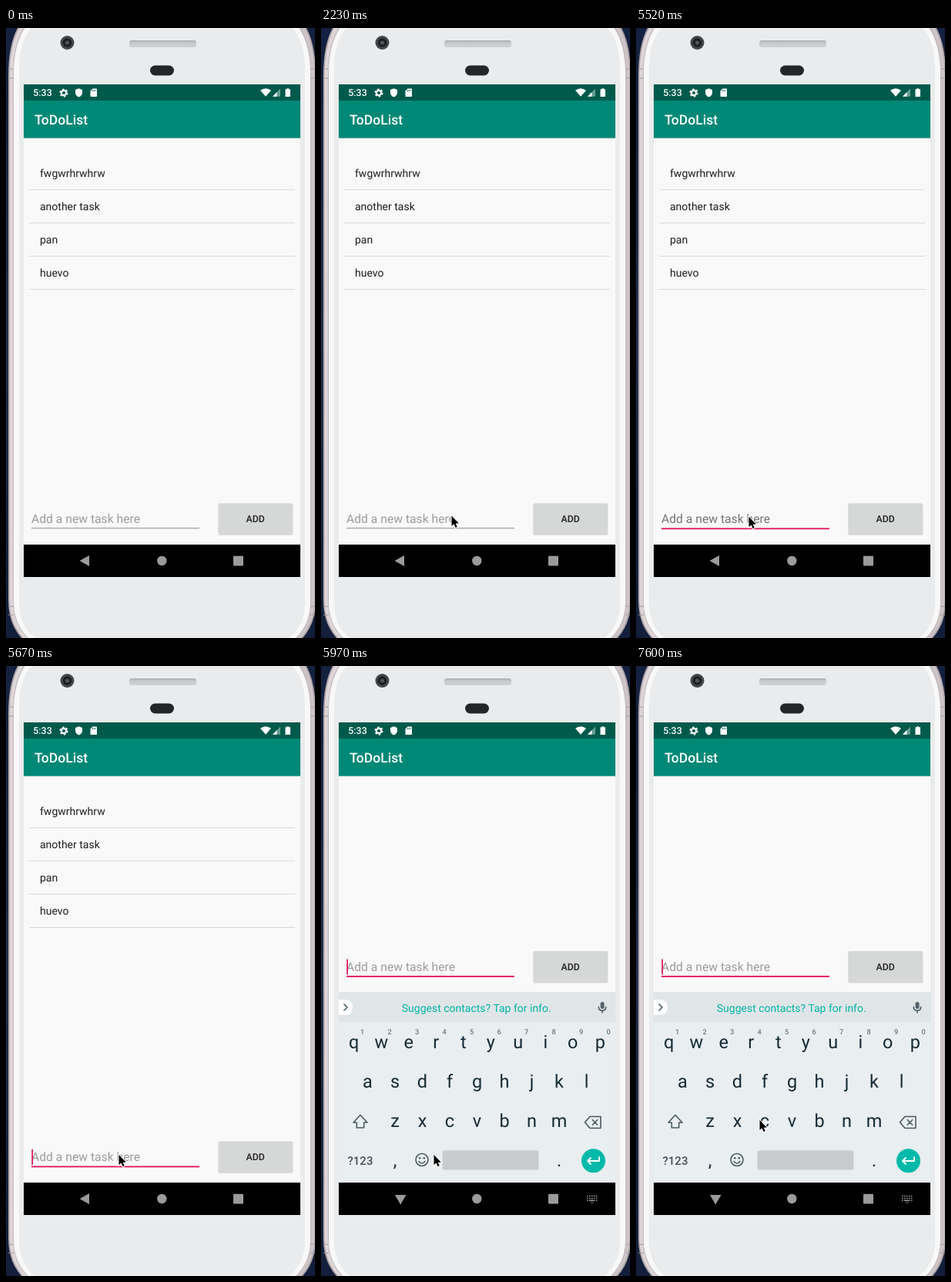
These frames come from a looping animation (401x790 px, 8 s). An HTML page:

```html
<!DOCTYPE html>
<html lang="en">
<head>
<meta charset="utf-8">
<title>To-do app demo</title>
<style>
  html, body { margin: 0; width: 100%; height: 100%; overflow: hidden; background: #17233f; }
  svg { display: block; width: 401px; height: 790px; }
  text { font-family: Roboto, "Noto Sans", sans-serif; text-rendering: geometricPrecision; }
  .medium { font-weight: 500; }
  .mid { text-anchor: middle; }
  .key { font-size: 23.5px; fill: #142b35; }
  .digit { font-size: 9.3px; font-weight: 500; fill: #6c7a80; }
  .line { fill: none; stroke: #4a5a62; stroke-width: 1.6; stroke-linejoin: round; stroke-linecap: round; }
</style>
</head>
<body>
<svg viewBox="0 0 401 790" xmlns="http://www.w3.org/2000/svg">
  <defs>
    <linearGradient id="night" x2="0" y2="1">
      <stop offset="0" stop-color="#14203f"/>
      <stop offset=".5" stop-color="#24304d"/>
      <stop offset="1" stop-color="#131f3a"/>
    </linearGradient>
    <linearGradient id="grille" x2="0" y2="1">
      <stop offset="0" stop-color="#a9abae"/>
      <stop offset=".35" stop-color="#c6c8ca"/>
      <stop offset="1" stop-color="#d0d2d4"/>
    </linearGradient>
    <clipPath id="screen"><rect x="23" y="73" width="359" height="638"/></clipPath>
    <g id="side">
      <path d="M203 0H15Q3 22 3 62V742Q3 771 20 790H203Z" fill="#aaa0a4"/>
      <path d="M203 0H17Q4.500 23 4.500 62V742Q4.500 770 22 790H203Z" fill="currentColor"/>
      <path d="M23 0Q9.500 22 9.500 60V744Q9.500 771 28 790" fill="none" stroke="#bfb6b9"/>
      <path d="M203 0H25Q10 22 10 60V744Q10 771 29 790H203Z" fill="#f9f8f9"/>
      <path d="M203 0H33Q17 18 17 52V745Q17 773 37 790H203Z" fill="#e9ebec"/>
      <path d="M3 53H10M3 65H10M3 749H10M3 760H10" stroke="#a09a9e"/>
    </g>
  </defs>

  <rect width="401" height="790" fill="url(#night)"/>
  <use href="#side" color="#ddd5d7"/>
  <use href="#side" color="#cdc4c7" transform="translate(405 0) scale(-1 1)"/>
  <circle cx="79.500" cy="19" r="9" fill="#44464a"/>
  <circle cx="79.500" cy="19" r="5.800" fill="#1d1e22"/>
  <circle cx="79.500" cy="19" r="2.600" fill="#50545b"/>
  <rect x="160" y="16" width="87" height="9" rx="3" fill="url(#grille)"/>
  <rect x="187" y="48.500" width="31" height="13" rx="6.500" fill="#242529"/>

  <g clip-path="url(#screen)">
    <rect x="23" y="73" width="359" height="638" fill="#f9f9f9"/>
    <rect x="23" y="94" width="359" height="48.600" fill="#008876"/>
    <rect x="23" y="73" width="359" height="21" fill="#005a4c"/>
    <text class="medium" x="37" y="125" font-size="17.500" fill="#fff">ToDoList</text>

    <g fill="#fff">
      <text class="medium" x="35.300" y="88.300" font-size="12.400">5:33</text>
      <g fill="none" stroke="#fff">
        <circle cx="75" cy="84" r="3.200" stroke-width="2.200"/>
        <circle cx="75" cy="84" r="4.800" stroke-width="1.500" stroke-dasharray="2.500 2.526"/>
      </g>
      <path d="M94.500 78.300L99 80V83.500Q99 87.500 94.500 89.500Q90 87.500 90 83.500V80Z"/>
      <path d="M112.500 78.500H117.200Q118 78.500 118 79.300V88.200Q118 89 117.200 89H110.300Q109.500 89 109.500 88.200V81.500Z"/>
      <path d="M112.500 80V82.200M114.300 80V82.200M116.100 80V82.200" stroke="#005a4c" stroke-width=".8"/>
      <path d="M330 80.800Q337 75.800 344 80.800L337 88.800Z"/>
      <path d="M346 88.800L356 78.500V88.800Z" opacity=".4"/>
      <path d="M346 88.800L351.500 83.100V88.800Z"/>
      <path d="M362.500 79.300H364.500V78.300H367V79.300H369V89H362.500Z"/>
    </g>

    <g id="list"></g>

    <g id="form">
      <text id="hint" x="33" y="641.300" font-size="15.700">Add a new task here</text>
      <rect id="rule" x="33" width="218"/>
      <rect id="caret" x="33.300" y="626" width="1.700" height="20" fill="#e3105f"/>
      <rect x="275.500" y="616" width="97" height="41" rx="2" fill="#000" opacity=".12"/>
      <rect x="275.500" y="615.500" width="96.500" height="40" rx="1.500" fill="#d6d7d7"/>
      <text class="medium mid" x="323.700" y="640.200" font-size="12.300" fill="#1f1f1f">ADD</text>
    </g>

    <rect x="23" y="669" width="359" height="42"/>

    <g id="board">
      <rect x="23" y="422" width="359" height="247" fill="#e9eef1"/>
      <rect x="23" y="422" width="359" height="39" fill="#e0e5e8"/>
      <path d="M23 432H31Q41 432 41 442T31 452H23Z" fill="#fff"/>
      <path class="line" d="M30 438L34 442L30 446"/>
      <text class="mid" x="201.700" y="447.700" font-size="14" fill="#00b5a2">Suggest contacts? Tap for info.</text>
      <rect x="362.600" y="435" width="5" height="9" rx="2.500" fill="#53636b"/>
      <path class="line" d="M360.300 441.500Q360.300 446.300 365 446.300T369.700 441.500M365 446.500V449"/>
      <g id="keys"></g>
      <path class="line" d="M51 581.500L60 591.300H55.700V598H46.300V591.300H42Z"/>
      <path class="line" d="M349 583.500H363V598.500H349L342.500 591ZM352.300 587.700L358.700 594.300M358.700 587.700L352.300 594.300"/>
      <text class="mid medium" x="51" y="645.500" font-size="15" fill="#42525a">?123</text>
      <text class="mid key" x="96" y="648">,</text>
      <text class="mid key" x="309" y="648">.</text>
      <circle class="line" cx="131" cy="639.500" r="8"/>
      <path class="line" d="M127 641.500Q131 646.500 135 641.500"/>
      <circle cx="128.200" cy="637.200" r="1.300" fill="#4a5a62"/>
      <circle cx="133.800" cy="637.200" r="1.300" fill="#4a5a62"/>
      <rect x="157.500" y="627.500" width="125" height="25" rx="2.500" fill="#c8cccf"/>
      <circle cx="353.500" cy="640.700" r="15.500" fill="#00b9a9"/>
      <path class="line" d="M361 636V641H346M350 637L346 641L350 645" style="stroke:#fff;stroke-width:1.8"/>
    </g>

    <g id="nav">
      <path id="back" d="M95.500 690L108 683V697Z"/>
      <path id="down" d="M96 685H110.500L103.200 697.500Z"/>
      <circle cx="202.300" cy="690" r="6.200"/>
      <rect x="295" y="683.700" width="13" height="12.800" rx="1"/>
      <g id="switcher" fill="none" stroke-width="1.500">
        <path d="M345 686.500H358.500M345 689.500H358.500" stroke-dasharray="1.600 1.350"/>
        <path d="M345 692.300H346.600M348 692.300H355.500M357 692.300H358.500"/>
        <path d="M350 694.500H353.600L351.800 696.500Z" stroke-width=".5"/>
      </g>
    </g>
  </g>

  <path id="pointer" d="M0 0V13.300L3 10.500L5.100 15.200L7.200 14.300L5.200 9.700H9.300Z"
        stroke="#fff" stroke-width="2" paint-order="stroke"/>
</svg>

<script>
const LOOP = 8000;
const $ = id => document.getElementById(id);
const set = (id, attrs) => Object.entries(attrs).forEach(([k, v]) => $(id).setAttribute(k, v));
const show = (id, on) => set(id, { visibility: on ? 'visible' : 'hidden' });

// Task list
$('list').innerHTML = ['fwgwrhrwhrw', 'another task', 'pan', 'huevo'].map((task, i) => `
  <text x="44" y="${193.3 + 43 * i}" font-size="14" fill="#1e1e1e">${task}</text>
  <rect x="30" y="${209 + 43 * i}" width="345" height="1" fill="#d9d9d9"/>`).join('');

// Letter keys: each row is centred on the board
const PITCH = 35.5, MIDDLE = 202.5;
const keyRow = (row, n) => [...row].map((key, i) => {
  const x = MIDDLE + PITCH * (i - (row.length - 1) / 2);
  const digit = n ? '' : `<text class="mid digit" x="${x + 11}" y="477">${(i + 1) % 10}</text>`;
  return `<text class="mid key" x="${x}" y="${495 + 51 * n}">${key}</text>${digit}`;
}).join('');
$('keys').innerHTML = ['qwertyuiop', 'asdfghjkl', 'zxcvbnm'].map(keyRow).join('');

// Pointer steps: time, x, y
const POINTER = [
  [1490, 313.7, 576.7], [1640, 222.5, 674.7], [1940, 181.5, 631.7], [2080, 175.5, 626.7],
  [2230, 169.5, 631.7], [2380, 168.5, 635.7], [3130, 151.5, 634.7], [3270, 146.5, 633],
  [7010, 150.5, 613.7], [7150, 160.5, 590.7], [7300, 160.5, 588]
];
const CARET = [5670, 6110, 6710, 7150, 7600];
const FOCUS = 5520, EDIT = 5670, OPEN = 5820, SETTLED = 5970;

function draw(t) {
  const focused = t >= FOCUS, open = t >= OPEN, sliding = open && t < SETTLED;

  show('list', !open);
  set('form', { transform: `translate(0 ${open ? -246.3 : 0})` });
  set('hint', { fill: focused && t < EDIT ? '#747474' : '#9b9b9b' });
  set('rule', focused
    ? { y: 647.5, height: 1.8, fill: '#e3105f' }
    : { y: 647.2, height: 1.2, fill: '#999' });
  show('caret', CARET.filter(at => t >= at).length % 2);

  show('board', open);
  set('board', { opacity: sliding ? 0.61 : 1, transform: `translate(0 ${sliding ? 39 : 0})` });

  const ink = sliding ? '#dadbdb' : '#9b9b9b';
  set('nav', { fill: ink });
  set('switcher', { stroke: ink });
  show('back', !open);
  show('down', open);
  show('switcher', open);

  const at = POINTER.filter(step => t >= step[0]).pop();
  show('pointer', at);
  if (at) set('pointer', { transform: `translate(${at[1]} ${at[2]})` });
}

const start = performance.now();
function tick() {
  draw((performance.now() - start) % LOOP);
  requestAnimationFrame(tick);
}
tick();
</script>
</body>
</html>
```
